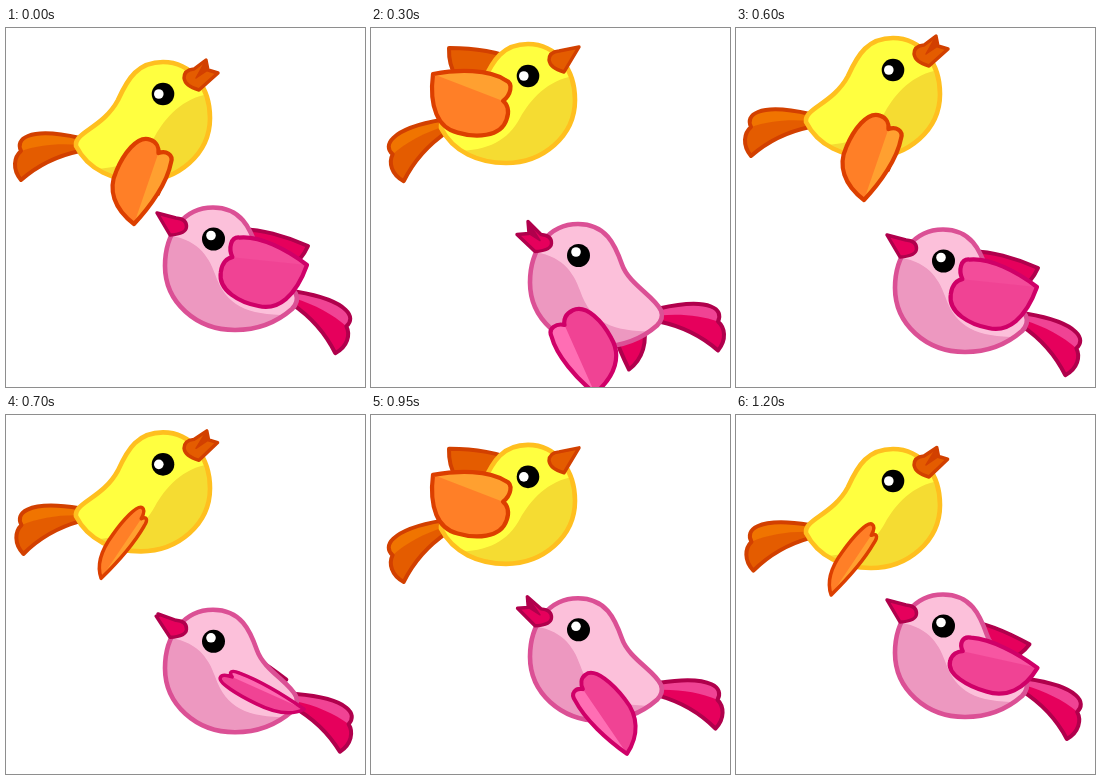
An HTML page that plays this animation: 359x359 px, repeating every 1250 ms.

```html
<!DOCTYPE html>
<html lang="en">
<head>
<meta charset="utf-8">
<title>Two birds</title>
<style>
html, body { margin: 0; width: 100%; height: 100%; overflow: hidden; background: #fff; }
svg { display: block; width: 100%; height: 100%; }
path { stroke-linejoin: round; stroke-linecap: round; }
</style>
</head>
<body>
<svg id="stage" viewBox="0 0 359 359"></svg>
<script>
const NS = 'http://www.w3.org/2000/svg';
const stage = document.getElementById('stage');
const STEP = 50, COUNT = 25, HALF = 12;

function add(parent, tag, attrs) {
  const node = document.createElementNS(NS, tag);
  for (const key in attrs) node.setAttribute(key, attrs[key]);
  return parent.appendChild(node);
}

const lerp = (a, b, t) => a + (b - a) * t;
const clamp = (x) => Math.max(0, Math.min(1, x));
const bend = (a, b, c, t) => lerp(lerp(a, b, t), lerp(b, c, t), t);

// Wing in its own frame: tip at 0,0, notch between the lobes at 75,0.
const MAIN_LOBE = [[0, 0], [8, 24], [24, 36], [44, 34], [62, 33], [86, 26], [85, 12], [85, 5], [80, 1], [75, 0]];
const SIDE_LOBE = [[75, 0], [80, -6], [79, -15], [70, -15], [50, -18], [22, -10], [0, 0]];

function curve(points) {
  const [first, ...rest] = points.map((p) => p.map((v) => v.toFixed(2)).join(' '));
  return 'M' + first + 'C' + rest.join(' ');
}

// The tip swings along an arc while the wing turns and folds; up runs from 0 to 1.
function wingAt(w, up, mirror) {
  const s = up + 0.045 * Math.sin(2 * Math.PI * up);
  const [x, y] = [0, 1].map((i) => bend(w.tip[0][i], w.tip[1][i], w.tip[2][i], s));
  const angle = lerp(w.turn[0], w.turn[1], s ** 1.15) * Math.PI / 180;
  const open = lerp(w.width[0], w.width[1], s ** w.fold);
  const width = Math.sign(open) * Math.max(0.18, Math.abs(open));
  const length = 1 + w.stretch * Math.sin(Math.PI * s);
  const c = Math.cos(angle), n = Math.sin(angle);
  const place = ([u, v]) => {
    const px = x + u * length * c + v * width * n;
    return [mirror ? 362 - px : px, y + u * length * n - v * width * c];
  };
  const main = MAIN_LOBE.map(place), side = SIDE_LOBE.map(place);
  return { all: curve(main.concat(side.slice(1))) + 'Z', side: curve(side) + 'Z', width };
}

function mix(a, b, t) {
  return 'rgb(' + a.map((v, i) => Math.round(lerp(v, b[i], t))).join(',') + ')';
}

const TAIL_TOP = 'M2-7C-20-12-40-13-50-9C-58-6-60 0-57 6';
const TAIL = TAIL_TOP + 'C-64 12-66 24-57 35C-40 20-22 11 2 6Z';

const yellow = {
  id: 'yellow', mirror: false, rise: -24,
  fill: '#ffff40', shade: '#f5dc32', edge: '#ffbf1f',
  dark: '#e45c00', darkEdge: '#d24000', tailTop: '#f07400',
  wing: [255, 127, 39], light: [255, 160, 48], wingEdge: '#dc3f00', fade: 0,
  body: 'M70 118C68 104 97 100 112 72C122 50 132 34 157 34C186 34 204 60 204 90C204 126 172 153 135 153C108 153 82 142 70 118Z',
  shadow: 'M212 65C180 66 160 88 149 108C137 130 118 141 84 141L90 170L215 165Z',
  eye: [157, 66, 11.3], glint: [152.8, 66, 4.8],
  pivot: 'translate(72 117)',
  beak: {
    shut: [208, 37], up: [200, 32], notch: [202, 42], low: [212, 45], corner: '190 50',
    back: 'L193 62Q179 58 178 50Q178 42 188 41Z'
  },
  near: { tip: [[128, 196], [36, 164], [62, 64]], turn: [-71, 21], width: [1, -1.35], fold: 0.9, stretch: -0.07 },
  far: { tip: [[152, 166], [105, 125], [78, 38]], turn: [-80, 22], width: [0.4, -0.9], fold: 1, stretch: 0 },
  beat: { mid: 19, high: 6, rate: 1 },
  up: (pose) => pose / 6
};

const pink = {
  id: 'pink', mirror: true, rise: 22,
  fill: '#fcc0da', shade: '#ed98c0', edge: '#db5095',
  dark: '#e6005c', darkEdge: '#b0004c', tailTop: '#f04394',
  wing: [240, 67, 148], light: [255, 110, 180], wingEdge: '#cf0068', fade: 0.8,
  body: 'M207 179.5C235 179.5 244 200 251 220C258 240 284 252 290 266Q293 274 286 281C270 295 250 302 229 302C190 302 159 274 159 238C159 205 178 179.5 207 179.5Z',
  shadow: 'M150 207C188 206 202 226 209 246C220 278 241 287 282 287L280 320L150 320Z',
  eye: [207.5, 211, 11.5], glint: [205, 207.5, 4.8],
  pivot: 'translate(290 271) scale(-1 1)',
  beak: {
    shut: [151, 185], up: [157, 177], notch: [158, 189], low: [146, 190], corner: '169 196',
    back: 'L164 207Q180 206 180.5 199Q181 191 170 190Z'
  },
  near: { tip: [[138, 349], [54, 323], [61, 237]], turn: [-66, -6], width: [1.1, -1.35], fold: 1.5, stretch: 0.07 },
  far: { tip: [[104, 325], [107, 278], [60, 218]], turn: [-80, -3], width: [0.65, -0.85], fold: 1, stretch: 0 },
  beat: { mid: 18.5, high: 5.4, rate: 0.9 },
  up: (pose) => 1 - pose / 6
};

function build(b) {
  const g = add(stage, 'g', {});
  const clip = add(g, 'clipPath', { id: b.id + '-body' });
  add(clip, 'path', { d: b.body });
  const outline = (parent, d, fill, stroke, width) =>
    add(parent, 'path', { d, fill, stroke, 'stroke-width': width });
  const dot = ([cx, cy, r], fill) => add(g, 'circle', { cx, cy, r, fill });

  const far = outline(g, '', b.dark, b.darkEdge, 4);
  const tail = add(g, 'g', {});
  add(tail, 'path', { d: TAIL, fill: b.dark });
  add(tail, 'path', { d: TAIL_TOP + 'C-40 0-20-2 2 0Z', fill: b.tailTop });
  outline(tail, TAIL, 'none', b.darkEdge, 4);

  add(g, 'path', { d: b.body, fill: b.fill });
  add(g, 'path', { d: b.shadow, fill: b.shade, 'clip-path': `url(#${b.id}-body)` });
  outline(g, b.body, 'none', b.edge, 4.6);

  const beak = outline(g, '', b.dark, b.darkEdge, 3.4);
  const mouth = outline(g, '', b.darkEdge, b.darkEdge, 1.5);
  dot(b.eye, '#000');
  dot(b.glint, '#fff');

  const wing = add(g, 'path', { fill: mix(b.wing, b.wing, 0) });
  const side = add(g, 'path', {});
  const rim = outline(g, '', 'none', b.wingEdge, 4);

  return (frame) => {
    const flap = ({ mid, high, rate }) => high - rate * Math.abs(frame - mid);
    const pose = Math.max(0, flap({ mid: 6, high: 6, rate: 1 }), flap(b.beat));
    const up = b.up(pose);

    // Ease out to the far point, then ease out on the way back.
    const back = frame > HALF;
    const eased = 1 - (1 - (back ? frame - HALF : frame) / HALF) ** 2;
    const lift = b.rise * (back ? 1 - eased : eased);
    g.setAttribute('transform', `translate(0 ${lift.toFixed(2)})`);
    tail.setAttribute('transform', `${b.pivot} rotate(${(-22.5 * up).toFixed(2)})`);

    const gape = clamp(1.2 * (1 - up) - 0.1), k = b.beak;
    const at = (p) => p.map((v, i) => lerp(k.shut[i], v, gape).toFixed(2)).join(' ');
    beak.setAttribute('d', `M${at(k.up)}L${at(k.notch)}L${at(k.low)}${k.back}`);
    mouth.setAttribute('d', gape > 0.2 ? `M${at(k.up)}L${at(k.notch)}L${k.corner}Z` : '');

    far.setAttribute('d', wingAt(b.far, up, b.mirror).all);
    const shape = wingAt(b.near, up, b.mirror);
    wing.setAttribute('d', shape.all);
    rim.setAttribute('d', shape.all);
    rim.setAttribute('stroke-width', lerp(3, 4.2, clamp(Math.abs(shape.width))));
    side.setAttribute('d', shape.side);
    side.setAttribute('fill', mix(b.light, b.wing, b.fade * clamp(-shape.width - 0.3)));
  };
}

const birds = [yellow, pink].map(build);

function draw(ms) {
  const frame = Math.floor(ms / STEP) % COUNT;
  birds.forEach((update) => update(frame));
}

const start = performance.now();
function tick() {
  draw(performance.now() - start);
  requestAnimationFrame(tick);
}
tick();
</script>
</body>
</html>
```
